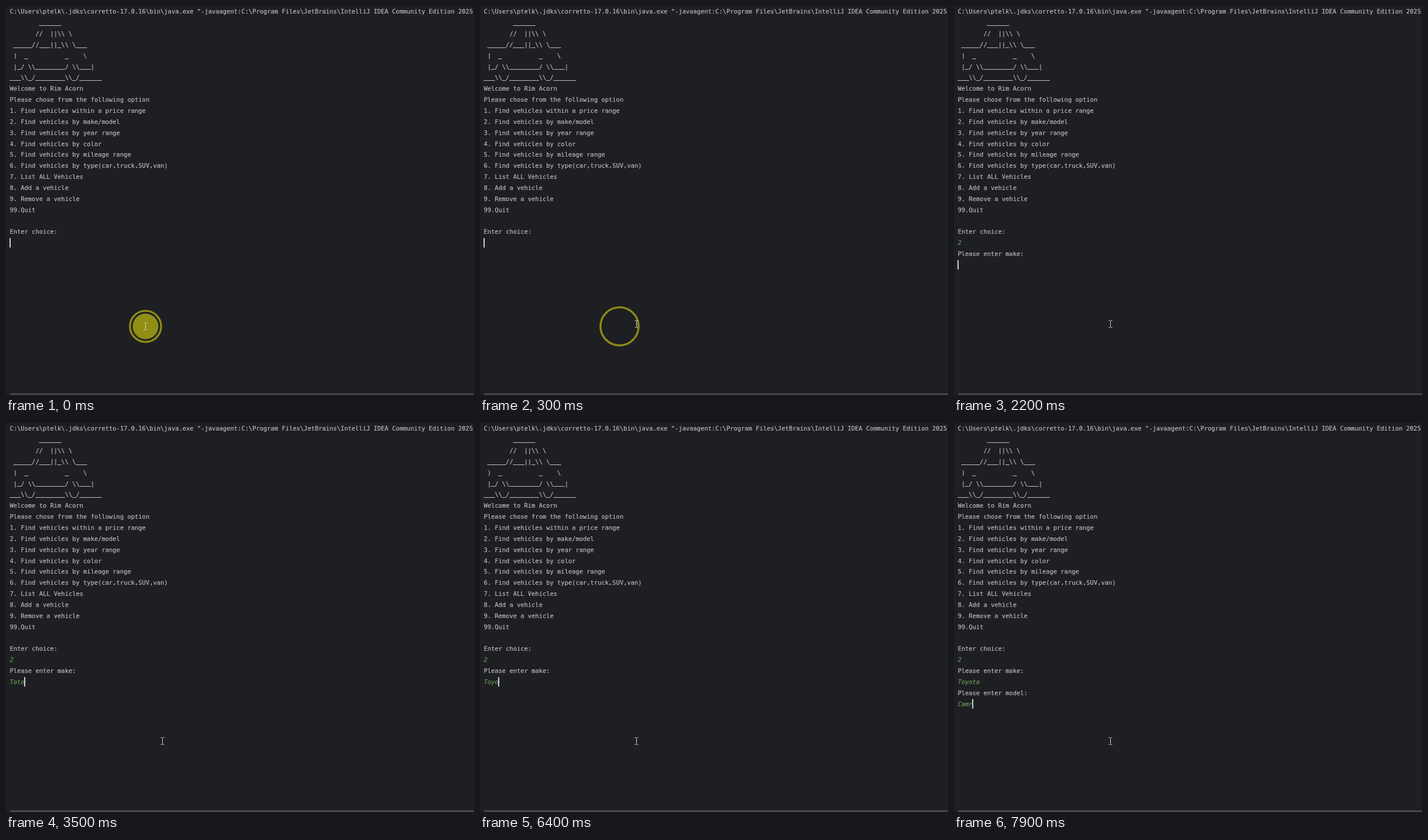
Write an HTML page that moves like this. It is 800 px wide and 666 px high and loops after 8000 ms.

```html
<!DOCTYPE html>
<html lang="en">
<head>
<meta charset="utf-8">
<title>Console session</title>
<style>
  html, body { margin: 0; width: 100%; height: 100%; overflow: hidden; background: #1e1f22; }
  svg { display: block; width: 800px; height: 666px; }
  text {
    font: 10.45px "DejaVu Sans Mono", "Noto Sans Mono", monospace;
    fill: #bcbec4; stroke: #bcbec4; stroke-width: .15; white-space: pre;
  }
  .input { font-style: italic; fill: #6a9f5b; stroke: #6a9f5b; }
  .rule { stroke-width: .6; }
</style>
</head>
<body>
<svg id="stage" viewBox="0 0 800 666">
  <rect width="800" height="666" fill="#1e1f22"/>
  <rect x="7" y="663" width="793" height="3" fill="#47484b"/>
  <g id="lines"></g>
  <rect id="caret" width="2" height="16" fill="#ced0d6"/>
  <circle id="halo" cx="238.5" cy="548.5" r="22" fill="#908e13"/>
  <circle id="ring" cx="238.5" cy="548.5" fill="none" stroke="#8e8b17" stroke-width="3.4"/>
  <path id="pointer" d="M-3 -6H-1L0 -5L1 -6H3M0 -5V5M-3 6H-1L0 5L1 6H3" fill="none" stroke="#d4d4d4" stroke-width="1"/>
</svg>
<script>
const LOOP = 8000, STEP = 100;
const CHAR = 6.291, LINE = 18.85, LEFT = 6.4, BASE = 13.3;
const $ = id => document.getElementById(id);

const intro = String.raw`C:\Users\ptelk\.jdks\corretto-17.0.16\bin\java.exe "-javaagent:C:\Program Files\JetBrains\IntelliJ IDEA Community Edition 2025
        ______
       //  ||\\ \
 _____//___||_\\ \___
 )  _          _    \
 |_/ \\________/ \\___|
___\\_/________\\_/______
Welcome to Rim Acorn
Please chose from the following option
1. Find vehicles within a price range
2. Find vehicles by make/model
3. Find vehicles by year range
4. Find vehicles by color
5. Find vehicles by mileage range
6. Find vehicles by type(car,truck,SUV,van)
7. List ALL Vehicles
8. Add a vehicle
9. Remove a vehicle
99.Quit

Enter choice:`.split("\n");

function addLine(row, content = "", cls = "", lift = 0) {
  const el = document.createElementNS("http://www.w3.org/2000/svg", "text");
  el.setAttribute("x", LEFT);
  el.setAttribute("y", BASE + row * LINE - lift);
  el.setAttribute("class", cls);
  el.textContent = content;
  $("lines").appendChild(el);
  return el;
}

// Underscores get their own layer: heavier and closer to the baseline
intro.forEach((s, row) => {
  addLine(row, s.replace(/_/g, " "));
  if (s.includes("_")) addLine(row, s.replace(/[^_]/g, " "), "rule", 1.1);
});
const choice = addLine(21, "", "input");
const askMake = addLine(22);
const make = addLine(23, "", "input");
const askModel = addLine(24);
const model = addLine(25, "", "input");

// Each entry: start time, typed text
const choiceKeys = [[1500, "2"]];
const makeKeys = [
  [3000, "T"], [3200, "To"], [3400, "Tot"], [3500, "Toto"], [3600, "Totoy"],
  [4100, "Totoya"], [4900, "Totoy"], [5300, "Toto"], [5500, "Tot"], [5700, "To"],
  [6100, "Toy"], [6400, "Toyo"], [6500, "Toyot"], [6700, "Toyota"]
];
const modelKeys = [[7300, "C"], [7500, "Ca"], [7700, "Cam"], [7900, "Camr"]];
// Each entry: start time, row the caret sits on
const caretRows = [[0, 21], [2000, 22], [2200, 23], [7000, 24], [7100, 25]];

function at(list, t, start) {
  let value = start;
  for (const [time, v] of list) if (t >= time) value = v;
  return value;
}

function draw(t) {
  choice.textContent = at(choiceKeys, t, "");
  make.textContent = at(makeKeys, t, "");
  model.textContent = at(modelKeys, t, "");
  askMake.textContent = t >= 2200 ? "Please enter make:" : "";
  askModel.textContent = t >= 7100 ? "Please enter model:" : "";

  const row = at(caretRows, t, 21);
  const typed = { 21: choice, 23: make, 25: model }[row];
  const col = typed ? typed.textContent.length : 0;
  $("caret").setAttribute("x", Math.round(5.5 + col * CHAR));
  $("caret").setAttribute("y", BASE + row * LINE - 11.7);
  $("caret").style.display = t >= 900 && t < 1500 ? "none" : "";

  // The click ring grows while the pointer glides away
  const p = Math.min(t / 300, 1);
  const glide = p * p * (3 - 2 * p);
  $("halo").style.display = t < 100 ? "" : "none";
  $("ring").style.display = t < 400 ? "" : "none";
  $("ring").setAttribute("r", 26.6 + 6 * p);
  $("pointer").setAttribute("transform",
    `translate(${238.5 + 29 * glide} ${548.5 - 4 * glide})`);
}

function frame(now) {
  draw(Math.floor((now % LOOP) / STEP) * STEP);
  requestAnimationFrame(frame);
}
draw(0);
requestAnimationFrame(frame);
</script>
</body>
</html>
```
